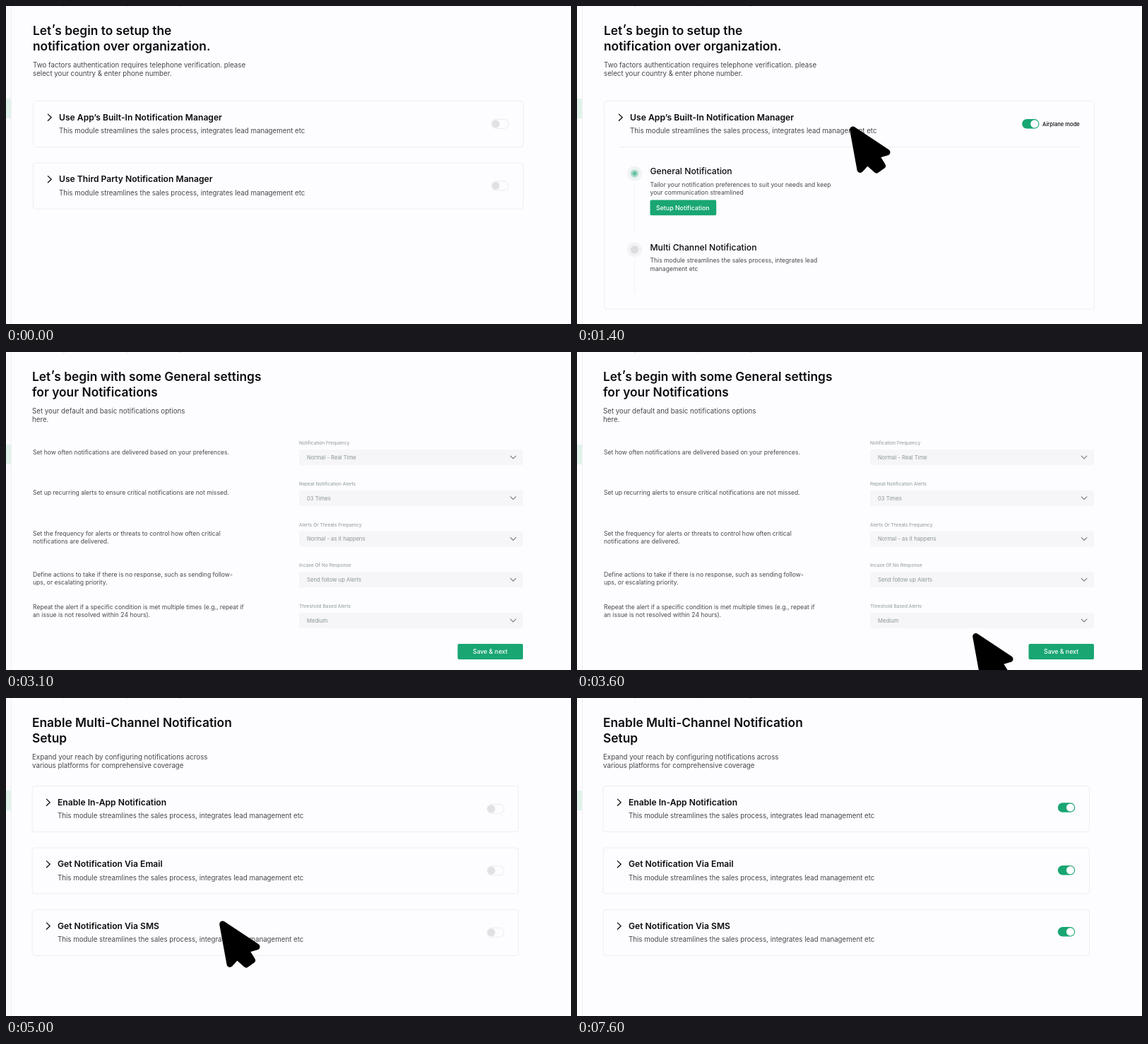
Write an HTML page that moves like this. It is 800 by 450 pixels and loops after 7700 ms.

```html
<!DOCTYPE html>
<html lang="en">
<head>
<meta charset="utf-8">
<title>Notification setup</title>
<style>
html, body { margin: 0; width: 100%; height: 100%; overflow: hidden; background: #fdfcfe; }
svg { display: block; width: 100vw; height: 100vh; font-family: Inter, Roboto, sans-serif; }
</style>
</head>
<body>
<svg id="stage" viewBox="0 0 800 450"></svg>
<script>
const LOOP = 7700, STEP = 100;
const GREEN = '#19a673', INK = '#0c0c0e', BODY = '#47474c', EDGE = '#eeeef1';
const MODULE = 'This module streamlines the sales process, integrates lead management etc';

const text = (x, y, size, str, fill = BODY, weight = 400) =>
  `<text x="${x}" y="${y}" font-size="${size}" fill="${fill}" font-weight="${weight}">${str}</text>`;
const lines = (x, y, size, gap, strs, fill, weight) =>
  strs.map((s, i) => text(x, y + i * gap, size, s, fill, weight)).join('');
const rect = (x, y, w, h, r, fill, stroke = 'none') =>
  `<rect x="${x}" y="${y}" width="${w}" height="${h}" rx="${r}" fill="${fill}" stroke="${stroke}"/>`;
const circle = (x, y, r, fill) => `<circle cx="${x}" cy="${y}" r="${r}" fill="${fill}"/>`;
const path = (d, stroke, width = 1) =>
  `<path d="${d}" fill="none" stroke="${stroke}" stroke-width="${width}" stroke-linecap="round" stroke-linejoin="round"/>`;
const group = (id, body) => `<g id="${id}">${body}</g>`;

const LETS = 'Let<tspan dx=".5" dy="-2.5">’</tspan><tspan dx=".7" dy="2.5">s</tspan>';
const heading = (x, strs) => lines(x, 41, 17.35, 22, strs, INK, 600);
const intro = (x, strs) => lines(x, 87.3, 9.74, 12, strs);
const arrow = (x, y) => path(`M${x} ${y - 4.6}l4.8 4.6l-4.8 4.6`, '#111', 1.3);
const card = (x, y, w, h) => rect(x, y, w, h, 4, 'none', EDGE);
const cardText = (x, y, title, k = 1) => arrow(x - 15.6, y) +
  text(x, y + 4.2, 12.13 * k, title, INK, 600) + text(x, y + 22.4, 9.72 * k, MODULE);
const toggleOff = (x, y) =>
  rect(x - 12, y - 6.5, 24, 13, 6.5, '#fdfcfe', '#ececef') + circle(x - 6, y, 5.5, '#e1e1e4');
const toggleOn = (x, y) =>
  rect(x - 12.2, y - 6.8, 24.4, 13.6, 6.8, GREEN) + circle(x + 5.5, y, 5.6, '#fff');
const button = (x, y, w, h, tx, label, size) =>
  rect(x, y, w, h, 2, GREEN) + text(tx, y + h / 2 + 3.2, size, label, '#fff', 500);

function chrome() {
  return rect(0, 0, 7, 450, 0, '#fcfbfd') + rect(0, 131, 7, 28, 0, '#e0f3eb') +
    path('M7.5 0V450', '#f0eff3') + path('M81 0h2M171 0h1M245 0h2', '#b5b5ba', .7);
}

const setupIntro = () => heading(38, [LETS + ' begin to setup the', 'notification over organization.']) +
  intro(38, ['Two factors authentication requires telephone verification. please',
    'select your country &amp; enter phone number.']);

function choice() {
  const titles = ['Use App’s Built-In Notification Manager', 'Use Third Party Notification Manager'];
  return setupIntro() + titles.map((s, i) => {
    const y = 134.5 + i * 87.5;
    return card(38.5, y, 694, 65) + cardText(75, y + 23.2, s) + toggleOff(699.5, y + 32.3);
  }).join('');
}

function node(y, state) {
  const [ring, mid, dot] = {
    idle: ['#f3f2f5', '#dddce0', '#dddce0'],
    active: ['#eff3f3', '#acdcca', '#62c19e'],
    done: ['#e3f3ec', GREEN, GREEN]
  }[state];
  return circle(81.5, y, 10.5, ring) + circle(81.5, y, 5.6, mid) + circle(81.5, y, 2.7, dot);
}

function steps(second) {
  return setupIntro() + card(38.5, 134.5, 694, 294.5) +
    cardText(75, 157.7, 'Use App’s Built-In Notification Manager', 1.005) +
    toggleOn(642.3, 166.8) + text(659, 169.7, 7.6, 'Airplane mode', INK, 500) +
    path('M59 199.3H712', EDGE) +
    path('M81.5 254V320M81.5 362V406', '#f2f1f4') +
    node(237, second ? 'done' : 'active') + node(344.7, second ? 'active' : 'idle') +
    text(103.5, 238.3, 12.2, 'General Notification', INK, 500) +
    lines(103.5, 255.6, 8.57, 11.2, ['Tailor your notification preferences to suit your needs and keep',
      'your communication streamlined']) +
    text(103.5, 346.3, 12.2, 'Multi Channel Notification', INK, 500) +
    lines(103.5, 363.4, 8.57, 11.2, ['This module streamlines the sales process, integrates lead', 'management etc']) +
    button(103.5, second ? 382.5 : 274.5, 93.7, 21.7, 112, 'Setup Notification', 8.8);
}

function settings() {
  const rows = [
    ['Notification Frequency', 'Normal - Real Time', 144.6,
      ['Set how often notifications are delivered based on your preferences.']],
    ['Repeat Notification Alerts', '03 Times', 202.3,
      ['Set up recurring alerts to ensure critical notifications are not missed.']],
    ['Alerts Or Threats Frequency', 'Normal - as it happens', 260.1,
      ['Set the frequency for alerts or threats to control how often critical', 'notifications are delivered.']],
    ['Incase Of No Response', 'Send follow up Alerts', 317.8,
      ['Define actions to take if there is no response, such as sending follow-', 'ups, or escalating priority.']],
    ['Threshold Based Alerts', 'Medium', 364,
      ['Repeat the alert if a specific condition is met multiple times (e.g., repeat if', 'an issue is not resolved within 24 hours).']]
  ];
  return heading(37, [LETS + ' begin with some General settings', 'for your Notifications']) +
    intro(37, ['Set your default and basic notifications options', 'here.']) +
    rows.map(([label, value, ty, note], i) => {
      const y = 138 + i * 57.75;
      return lines(38, ty, 8.6, 11.1, note) + text(415, y - 7, 6.65, label, '#8b9994') +
        rect(415, y, 317, 22, 2, '#f6f5f8') + text(426, y + 13.8, 7.68, value, '#8b9793') +
        path(`M714.3 ${y + 9.2}l3.8 3.7l3.8 -3.7`, '#6f7975', 1.1);
    }).join('') +
    button(639.5, 413, 92.5, 22, 661, 'Save &amp; next', 8.75);
}

function channels() {
  const titles = ['Enable In-App Notification', 'Get Notification Via Email', 'Get Notification Via SMS'];
  const onY = [155, 243.7, 330.8];
  return heading(37, ['Enable Multi-Channel Notification', 'Setup']) +
    intro(37, ['Expand your reach by configuring notifications across',
      'various platforms for comprehensive coverage']) +
    titles.map((s, i) => {
      const y = 124.5 + i * 87.5;
      return card(37, y, 688.5, 65) + cardText(73, y + 23.2, s) +
        group('off' + i, toggleOff(693.2, y + 32.3)) + group('on' + i, toggleOn(693, onY[i]));
    }).join('');
}

const POINTER = '<path d="M4.7 5L53 37L37.5 41.5L46.5 56L38 62L25 50.5L15 61.5Z" stroke="#000" stroke-width="9" stroke-linejoin="round"/>';

document.getElementById('stage').innerHTML = chrome() +
  group('choice', choice()) + group('steps', steps(false)) + group('settings', settings()) +
  group('steps2', steps(true)) + group('channels', channels()) + group('pointer', POINTER);

const el = id => document.getElementById(id);
const show = (id, a) => {
  el(id).setAttribute('opacity', a);
  el(id).setAttribute('visibility', a > 0 ? 'visible' : 'hidden');
};
const clamp = v => Math.max(0, Math.min(1, v));
const ease = u => u < .5 ? 2 * u * u : 1 - 2 * (1 - u) * (1 - u);

// Pointer keys: time, centre x, centre y, scale
const PRESS = .62;
const KEYS = [
  [100, 415, 490, 1], [900, 415, 203.5, 1], [1000, 415, 203.5, PRESS], [1100, 415, 203.5, PRESS],
  [1200, 415, 203.5, 1], [1500, 415, 203.5, 1], [2200, 197, 319, 1], [2300, 197, 319, PRESS],
  [2499, 197, 319, PRESS], [2500, 589, 490, 1],
  [3200, 589, 490, 1], [3600, 589, 431, 1], [3800, 700, 455, 1], [3900, 700, 455, PRESS],
  [3999, 700, 455, PRESS], [4000, 170, 490, 1],
  [4600, 170, 417, 1], [4700, 170, 417, PRESS], [4800, 170, 417, PRESS], [4900, 198, 405, 1],
  [5000, 331, 348.5, 1], [5300, 723, 187, 1], [5400, 723, 187, PRESS], [5500, 723, 187, PRESS],
  [5600, 723, 187, 1], [5700, 723, 274, 1], [5800, 723, 274, PRESS], [5900, 723.5, 363.5, 1],
  [6000, 724, 363, PRESS]
];

function pointerAt(t) {
  const i = KEYS.findIndex(k => k[0] > t);
  if (i === 0) return KEYS[0].slice(1);
  if (i < 0) return KEYS[KEYS.length - 1].slice(1);
  const a = KEYS[i - 1], b = KEYS[i], u = ease((t - a[0]) / (b[0] - a[0]));
  return [1, 2, 3].map(n => a[n] + (b[n] - a[n]) * u);
}

function draw(t) {
  const open = clamp((t - 1000) / 300);
  show('choice', 1 - open);
  show('steps', t < 2500 ? open : 0);
  show('settings', +(t >= 2500 && t < 4000));
  show('steps2', +(t >= 4000 && t < 4900));
  const last = t >= 4900;
  show('channels', +last);
  [5500, 5800, 6000].forEach((at, i) => {
    show('on' + i, +(last && t >= at));
    show('off' + i, +(last && t < at));
  });
  const [x, y, s] = pointerAt(t);
  show('pointer', +(t < 6600));
  el('pointer').setAttribute('transform', `translate(${x} ${y}) scale(${s}) translate(-29 -33.5)`);
}

// The picture advances ten times a second
const start = performance.now();
function tick() {
  const t = (performance.now() - start + 5) % LOOP;
  draw(Math.floor(t / STEP) * STEP);
  requestAnimationFrame(tick);
}
draw(0);
requestAnimationFrame(tick);
</script>
</body>
</html>
```
